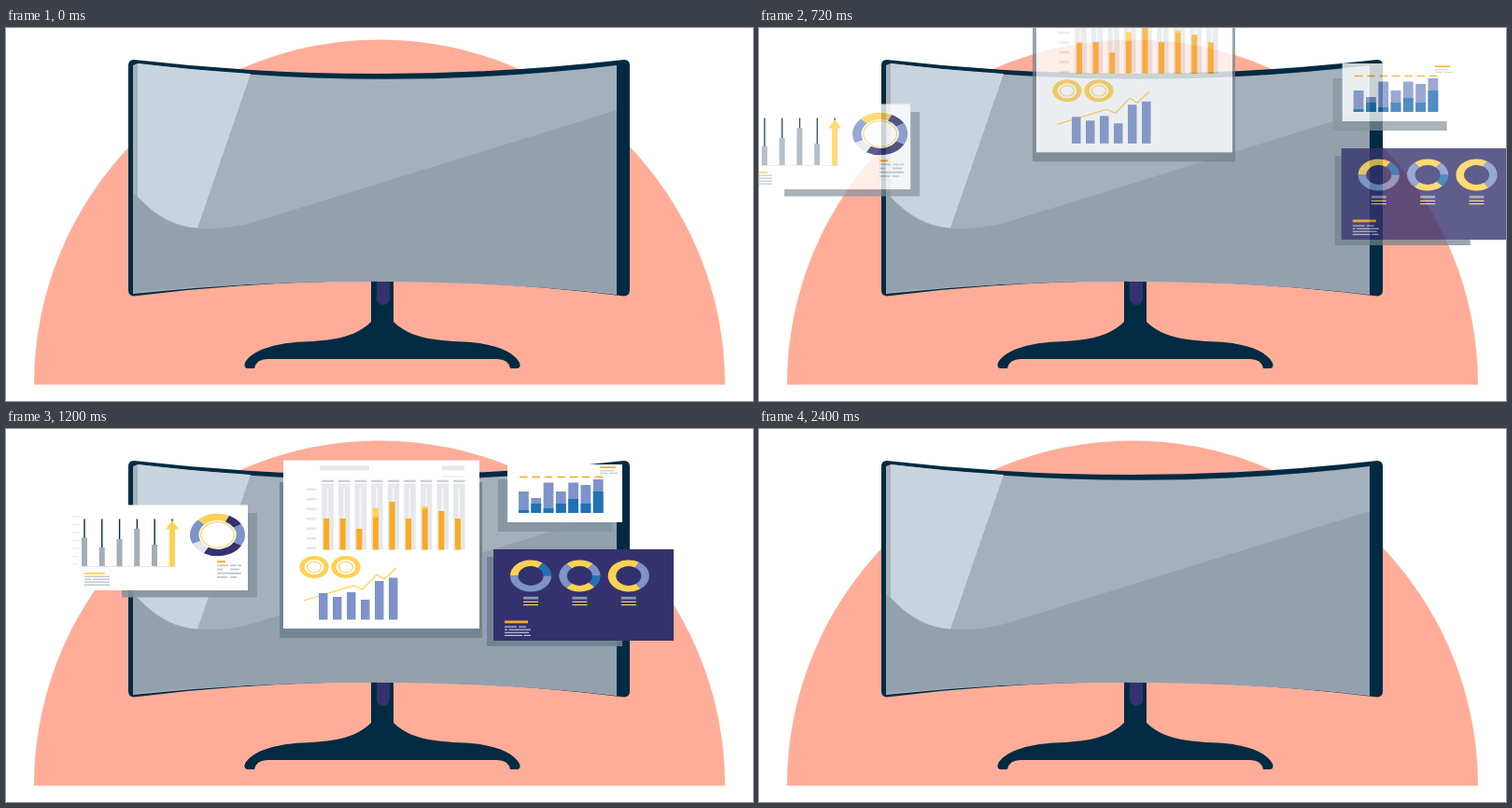
Animation of 800 by 400 pixels, one loop 2430 ms. Source, as an HTML page:

```html
<!DOCTYPE html>
<html lang="en">
<head>
<meta charset="utf-8">
<title>Dashboard monitor</title>
<style>
  html, body { margin: 0; width: 100%; height: 100%; overflow: hidden; background: #fff; }
  svg { display: block; width: 100%; height: 100%; }
</style>
</head>
<body>
<svg viewBox="0 0 800 400">
  <path fill="#ffad99" d="M30 382.5a370 370 0 0 1 740 0z"/>
  <g fill="#002b43">
    <path d="M137 34Q400 64 662 34Q668 34 668 40V281Q668 287 662 287.500Q400 255 137 287.500Q131 287 131 281V40Q131 34 137 34z"/>
    <path d="M391 270V315C373 333 347 335 318 336.500C285 338 262 347 256 359Q254 365 260 365H266Q268 355 280 355H526Q538 355 540 365H546Q552 365 550 359C543 346 522 338 490 336.500C460 335 433 333 415 315V270z"/>
  </g>
  <path fill="#33326e" d="M397 272H411V290a7 7 0 0 1-14 0z"/>
  <path fill="#a4b0bb" d="M136 40L141 38Q400 70.500 654 40V286Q400 257 136 285z"/>
  <path fill="#93a1ad" d="M136 177L141 181Q170 214 205 214.500Q238 217 268 207.500L654 88V285Q400 259.500 136 283.500z"/>
  <path fill="#c7d4dd" d="M141 38Q200 45 262 49L205 214.500Q170 212 141 181z"/>
  <g id="panels"></g>
</svg>
<script>
const NAVY = '#33326e', BLUE = '#7d93c9', DEEP = '#2171b5', YELLOW = '#ffd152',
      ORANGE = '#fbaa21', GREY = '#a2aeb8', PALE = '#e5e7ea', INK = '#002b43', TEXT = '#bcc4cb';

const rect = (x, y, w, h, fill) =>
  `<rect x="${x}" y="${y}" width="${w}" height="${h}" fill="${fill}"/>`;
const each = (list, draw) => list.map(draw).join('');
const rows = (x, y, step, widths, h, fill) =>
  each(widths, (w, i) => rect(x, y + i * step, w, h, fill));
const bars = (x, step, w, bottom, tops, fill) =>
  each(tops, (top, i) => rect(x + i * step, top, w, bottom - top, fill));

// Segments are [start angle, sweep, colour], clockwise from 12 o'clock.
const donut = (cx, cy, r, squash, width, segments) =>
  `<g transform="translate(${cx} ${cy}) scale(1 ${squash})" fill="none" stroke-width="${width}">` +
  each(segments, ([start, sweep, colour]) =>
    `<circle r="${r}" pathLength="360" stroke="${colour}" stroke-dasharray="${
      sweep < 360 ? `${sweep} ${360 - sweep}` : 'none'}" transform="rotate(${start - 90})"/>`) + '</g>';
const ring = (cx, cy, r, width) => donut(cx, cy, r, .77, width, [[0, 360, YELLOW]]);

function trends() {
  return rect(60, 81.5, 199, 91.5, '#fff') +
    rows(71, 93.5, 8.5, Array(7).fill(7), 1, PALE) +
    rect(78, 147, 104, 1, PALE) +
    bars(83.3, 18.8, 1.4, 147, Array(6).fill(96.5), INK) +
    bars(81, 18.75, 6, 147, [116.5, 127, 118, 107, 124], GREY) +
    `<path fill="${YELLOW}" d="M178 98L185 107.500H181V147.500H175V107.500H171z"/>` +
    donut(226.5, 113.5, 24.8, .77, 9.5, [[-45, 70, YELLOW], [25, 35, NAVY], [60, 60, BLUE],
      [120, 90, NAVY], [210, 35, PALE], [245, 70, BLUE]]) +
    ring(226.5, 113.5, 17.8, 1.3) +
    rect(84, 154, 22, 1.8, YELLOW) +
    rows(84, 157.5, 3, [27, 7, 27, 27], 1.4, TEXT) + rect(93, 160.5, 18, 1.4, TEXT) +
    rect(226, 141.3, 9, 2, ORANGE) +
    rows(226, 145.5, 4.2, [12, 6, 24, 11], 1.6, TEXT) +
    rows(240, 145.5, 4.2, [7, 10, 12, 7], 1.6, TEXT) + rect(248, 145.5, 4, 1.6, TEXT);
}

function report() {
  return rect(297, 33.5, 210, 180.5, '#fff') +
    rect(336, 39.5, 53, 4.8, PALE) + rect(467, 39.5, 24, 4.8, PALE) + rect(467, 50.5, 24, 1, PALE) +
    rows(321.5, 63.5, 10.5, Array(7).fill(11), 2.6, PALE) +
    each([96, 96, 107, 94, 78, 96, 85, 88, 96], (top, i) => {
      const x = 338.3 + i * 17.6;
      return rect(x, 54.7, 12.5, 2.2, '#c9cdd2') + rect(x, 58.5, 12.5, 71, PALE) +
        rect(x + 5, 63, 2, 66, '#f5f6f7') + rect(x + 1.8, top, 6, 129.5 - top, ORANGE);
    }) +
    rect(392.9, 85, 6, 9.5, YELLOW) + rect(445.7, 83, 6, 2.5, YELLOW) +
    each([330, 364], x => ring(x, 148, 13, 5.2) + ring(x, 148, 7.5, 1.2)) +
    `<path fill="none" stroke="${YELLOW}" stroke-width="1.3" d="M319 184L372 168L382 172L397 156L405 161L418 149"/>` +
    bars(335, 15, 9.5, 204.5, [176, 180, 175, 183, 163, 159.5], BLUE);
}

function columns() {
  return rect(537, 38, 123, 62, '#fff') +
    rect(636, 40.3, 17, 1.8, ORANGE) +
    rect(636, 44.3, 15, 1, TEXT) + rect(636, 46.8, 8, 1, TEXT) + rect(646, 46.8, 9, 1, TEXT) +
    bars(550, 13.4, 8.5, 52.3, Array(7).fill(50.7), ORANGE) +
    bars(549, 13.3, 10.8, 90, [67, 74, 57.5, 67, 57.5, 60, 54], BLUE) +
    bars(549, 13.3, 10.8, 90, [87, 80, 85, 80, 75, 80, 67], DEEP);
}

function shares() {
  const charts = [
    [[-90, 125, YELLOW], [35, 55, DEEP], [90, 180, BLUE]],
    [[-40, 80, YELLOW], [40, 50, BLUE], [90, 45, DEEP], [135, 85, YELLOW], [220, 100, BLUE]],
    [[30, 115, BLUE], [145, 245, YELLOW]]
  ];
  return rect(522, 129, 193, 98, NAVY) +
    each(charts, (segments, i) => {
      const x = 562 + i * 52.4;
      return donut(x, 157.5, 17.8, .77, 8.6, segments) +
        rect(x - 8, 179.8, 16, 2.8, '#8f98ad') + rows(x - 8, 184.8, 3.2, [16, 16], 1.2, YELLOW);
    }) +
    rect(534, 205.5, 25, 2.8, ORANGE) +
    rows(534, 211.5, 3.1, [13, 3, 26, 19], 1.2, '#c3c3d6') +
    rect(549, 211.5, 8, 1.2, '#c3c3d6') + rect(538.5, 214.6, 23.5, 1.2, '#c3c3d6') +
    rect(554.5, 220.8, 7.5, 1.2, '#c3c3d6');
}

const LIGHT_SHADE = 'rgba(133,149,159,.9)', DARK_SHADE = 'rgba(112,130,141,.9)';
const panels = [
  { dx: -276, dy: 0, art: rect(124, 90, 145, 90.5, LIGHT_SHADE) + trends() },
  { dx: 0, dy: -230, art: rect(293, 57, 217, 167, DARK_SHADE) + report() },
  { dx: 250, dy: 0, art: rect(527, 54, 122, 56, LIGHT_SHADE) + columns() },
  { dx: 290, dy: 0, art: rect(515, 137, 145, 96, DARK_SHADE) + shares() }
];
const host = document.getElementById('panels');
host.innerHTML = each(panels, p => `<g>${p.art}</g>`);

const LOOP = 2430, ARRIVE = 1200, LEAVE = 1800, GONE = 2400;
const progress = (t, from, to) => Math.min(1, Math.max(0, (t - from) / (to - from)));

function frame() {
  const t = performance.now() % LOOP;
  const p = progress(t, 0, ARRIVE);
  const away = 1 - p * p * (3 - 2 * p);
  const fadeIn = Math.sin(progress(t, 60, ARRIVE) * Math.PI / 2);
  const fadeOut = (1 - progress(t, LEAVE, GONE)) ** 1.2;
  panels.forEach(({ dx, dy }, i) => {
    const g = host.children[i];
    g.setAttribute('transform', `translate(${dx * away} ${dy * away})`);
    g.setAttribute('opacity', fadeIn * fadeOut);
  });
  requestAnimationFrame(frame);
}
frame();
</script>
</body>
</html>
```
